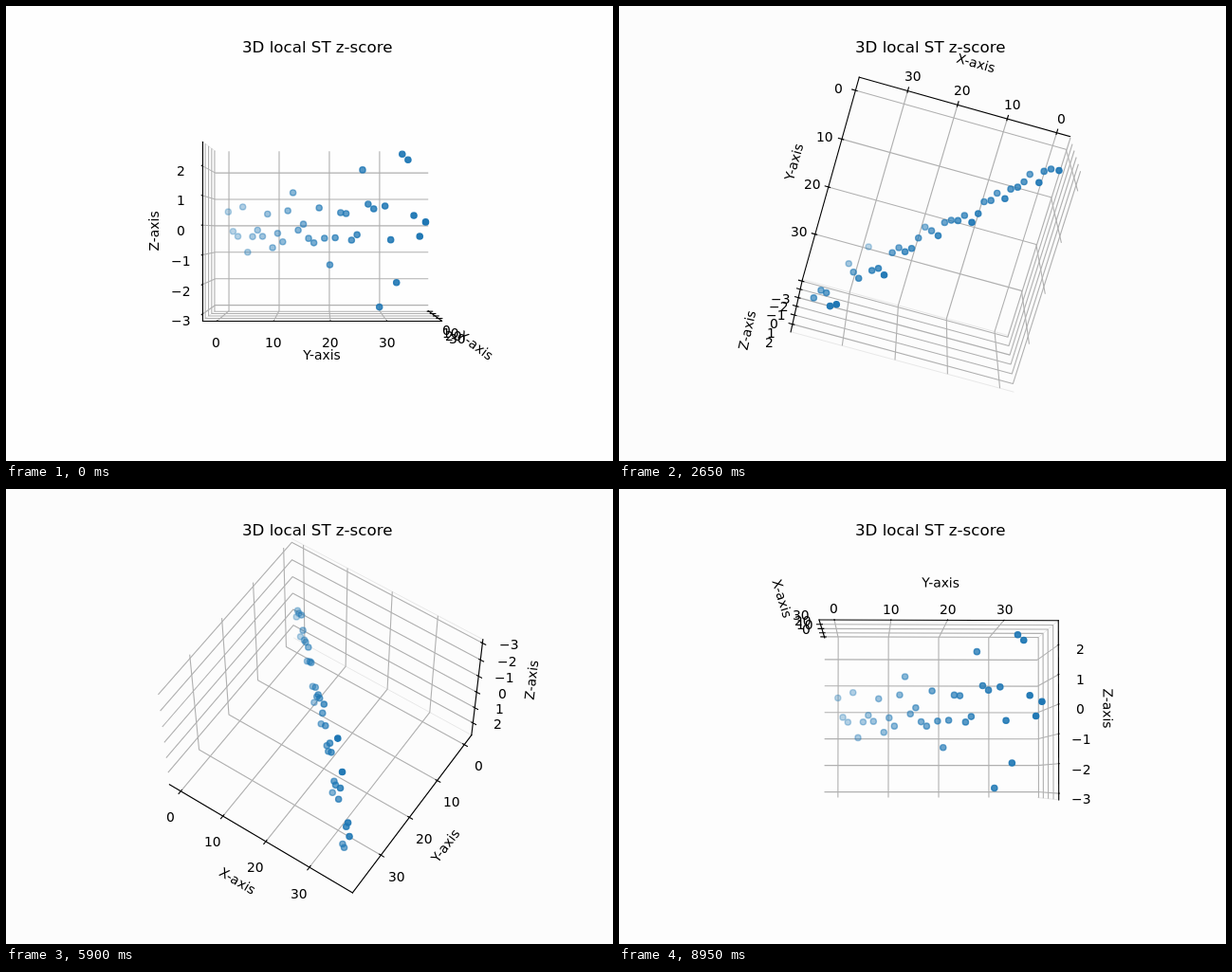
An HTML page with a canvas for the animation above (9000 ms loop, 640 px wide and 480 px high).

```html
<!DOCTYPE html>
<html lang="en">
<head>
<meta charset="utf-8">
<title>3D local ST z-score</title>
<style>
  html, body { margin: 0; width: 100%; height: 100%; overflow: hidden; background: #fdfdfd; }
  canvas { display: block; width: 640px; height: 480px; }
</style>
</head>
<body>
<canvas id="stage" width="640" height="480"></canvas>
<script>
const ctx = document.getElementById('stage').getContext('2d');
const FONT = '"DejaVu Sans", sans-serif';
const STEP_MS = 50, STEPS = 180;

// Camera: box centre on screen, pixels per unit at depth 1, eye distance
const CX = 333, CY = 237.4, FOCAL = 1997.84, DIST = 10;

// Box measures, per axis
const half = [4 / 7, 4 / 7, 3 / 7];
const delta = half.map(h => h / 6);
const edge = half.map((h, i) => h + delta[i] / 4);

const PT = 100 / 72;
const LINE = 0.8 * PT;
const PER_POINT = 48 / (72 * 2 * 3.696);
const TICK_PAD = 11.5 * PER_POINT;
const LABEL_PAD = 25 * PER_POINT;

const scores = [
  0.524, -0.209, -0.397, 0.702, -0.984, -0.406, -0.163, -0.394, 0.429, -0.806,
  -0.282, -0.589, 0.539, 1.193, -0.164, 0.051, -0.461, -0.62, 0.632, -0.452,
  -1.398, -0.434, 0.452, 0.42, -0.515, -0.328, 1.939, 0.74, 0.576, -2.831,
  0.666, -0.499, -1.966, 2.437, 2.236, 0.331, -0.375, 0.107
];
const unitXY = v => (v - 18.5) / 40.7 * 8 / 7;
const unitZ = v => (v + 0.197) / 5.795 * 6 / 7;
const points = scores.map((z, i) => [unitXY(i), unitXY(i), unitZ(z)]);

// side: dimension in which the axis line sits on the near side, also the tick direction
const axes = [
  { dim: 0, side: 1, name: 'X-axis', ticks: [0, 10, 20, 30], unit: unitXY },
  { dim: 1, side: 0, name: 'Y-axis', ticks: [0, 10, 20, 30], unit: unitXY },
  { dim: 2, side: 0, name: 'Z-axis', ticks: [-3, -2, -1, 0, 1, 2], unit: unitZ }
];
const paneLoss = [6.375, 12.75, 9.5625];

const dot = (a, b) => a[0] * b[0] + a[1] * b[1] + a[2] * b[2];
const put = (p, dim, v) => p.map((c, i) => i === dim ? v : c);
const outward = (p, dim, pad) =>
  p.map((c, i) => i === dim ? c : c + (c < 0 ? -1 : 1) * pad * delta[i]);

function makeView(angle) {
  const s = Math.sin(angle), c = Math.cos(angle);
  const right = [-s, c, 0];
  const up = [-s * c, -s * s, c];
  const toEye = [c * c, c * s, s];
  const project = p => {
    const depth = DIST - dot(toEye, p);
    return [CX + dot(right, p) / depth * FOCAL, CY - dot(up, p) / depth * FOCAL, depth];
  };
  return { toEye, project };
}

function polyline(pts, color, width, cap = 'butt') {
  ctx.strokeStyle = color;
  ctx.lineWidth = width;
  ctx.lineCap = cap;
  ctx.lineJoin = 'round';
  ctx.beginPath();
  pts.forEach(p => ctx.lineTo(p[0], p[1]));
  ctx.stroke();
}

// Lines that are exactly upright or level sit on whole pixels
function axisLine(a, b) {
  const straight = Math.abs(a[0] - b[0]) < 1e-4 || Math.abs(a[1] - b[1]) < 1e-4;
  const snap = p => [Math.round(p[0]) + 0.5, Math.round(p[1]) + 0.5];
  polyline(straight ? [snap(a), snap(b)] : [a, b], '#000', LINE, 'square');
}

function textAt(str, x, baseline) {
  ctx.textAlign = 'left';
  ctx.fillText(str, Math.round(x - ctx.measureText(str).width / 2), Math.round(baseline));
}

function rotatedText(str, x, y, degrees) {
  ctx.save();
  ctx.translate(x, y);
  ctx.rotate(-degrees * Math.PI / 180);
  ctx.textAlign = 'center';
  ctx.fillText(str, 0, 4);
  ctx.restore();
}

function readingAngle(a, b) {
  let deg = Math.atan2(a[1] - b[1], b[0] - a[0]) * 180 / Math.PI;
  deg = (Math.round(deg * 1e6) / 1e6 + 180) % 180;
  return deg > 90 ? deg - 180 : deg;
}

function paneCorners(dim, far) {
  const [a, b] = [0, 1, 2].filter(i => i !== dim);
  return [[-1, -1], [1, -1], [1, 1], [-1, 1]].map(([s, t]) =>
    put(put(put(far, a, s * edge[a]), b, t * edge[b]), dim, far[dim]));
}

function area(poly) {
  let sum = 0;
  poly.forEach((p, i) => {
    const q = poly[(i + 1) % poly.length];
    sum += p[0] * q[1] - q[0] * p[1];
  });
  return Math.abs(sum) / 2;
}

function drawBackground(panes) {
  const loss = panes.reduce((sum, pane, i) => sum + area(pane) * paneLoss[i], 0);
  const g = Math.floor(255 - loss / (640 * 480));
  ctx.fillStyle = `rgb(${g},${g},${g})`;
  ctx.fillRect(0, 0, 640, 480);
  polyline(panes[1], '#e8e8e8', 1);
}

function drawGrid({ dim, ticks, unit }, far, near, project) {
  const first = (dim + 1) % 3, last = (dim + 2) % 3;
  ticks.forEach(t => {
    const mid = put(far, dim, unit(t));
    const path = [put(mid, first, near[first]), mid, put(mid, last, near[last])];
    polyline(path.map(project), '#b0b0b0', LINE);
  });
}

function drawAxis({ dim, side, name, ticks, unit }, far, near, project) {
  const start = put(far, side, near[side]);
  const a = project(start), b = project(put(start, dim, near[dim]));
  axisLine(a, b);

  ctx.fillStyle = '#000';
  ctx.font = `${10 * PT}px ${FONT}`;
  const label = project(outward(put(start, dim, 0), dim, LABEL_PAD));
  rotatedText(name, label[0], label[1], readingAngle(a, b));

  const inward = Math.sign(far[side]) * delta[side];
  ticks.forEach(t => {
    const pos = put(start, dim, unit(t));
    const ends = [0.1, -0.2].map(f => project(put(pos, side, pos[side] + f * inward)));
    polyline(ends, '#000', LINE, 'square');
    const [x, y] = project(outward(pos, dim, TICK_PAD));
    textAt(String(t).replace('-', '\u2212'), x, y + 11);
  });
}

function drawPoints(project) {
  const dots = points.map(project).sort((p, q) => q[2] - p[2]);
  const shade = d => -DIST / d;
  const lo = shade(dots[dots.length - 1][2]), hi = shade(dots[0][2]);
  ctx.lineWidth = PT;
  dots.forEach(([x, y, d]) => {
    const alpha = 1 - 0.7 * (shade(d) - lo) / (hi - lo);
    ctx.fillStyle = ctx.strokeStyle = `rgba(31,119,180,${alpha})`;
    ctx.beginPath();
    ctx.arc(x, y, Math.sqrt(20) * PT / 2, 0, 2 * Math.PI);
    ctx.fill();
    ctx.stroke();
  });
}

function draw(step) {
  const { toEye, project } = makeView(step * 2 * Math.PI / STEPS);
  const fromTop = Math.abs(toEye[2]) > 0.5;
  const far = toEye.map((w, i) => {
    const high = Math.abs(w) < 1e-9 ? fromTop : w < 0;
    return high ? edge[i] : -edge[i];
  });
  const near = far.map(v => -v);

  drawBackground(axes.map(({ dim }) => paneCorners(dim, far).map(project)));
  axes.forEach(axis => drawGrid(axis, far, near, project));
  axes.forEach(axis => drawAxis(axis, far, near, project));
  drawPoints(project);

  ctx.fillStyle = '#000';
  ctx.font = `${12 * PT}px ${FONT}`;
  textAt('3D local ST z-score', 328, 49);
}

function loop() {
  draw(Math.floor(performance.now() / STEP_MS) % STEPS);
  requestAnimationFrame(loop);
}
loop();
</script>
</body>
</html>
```
